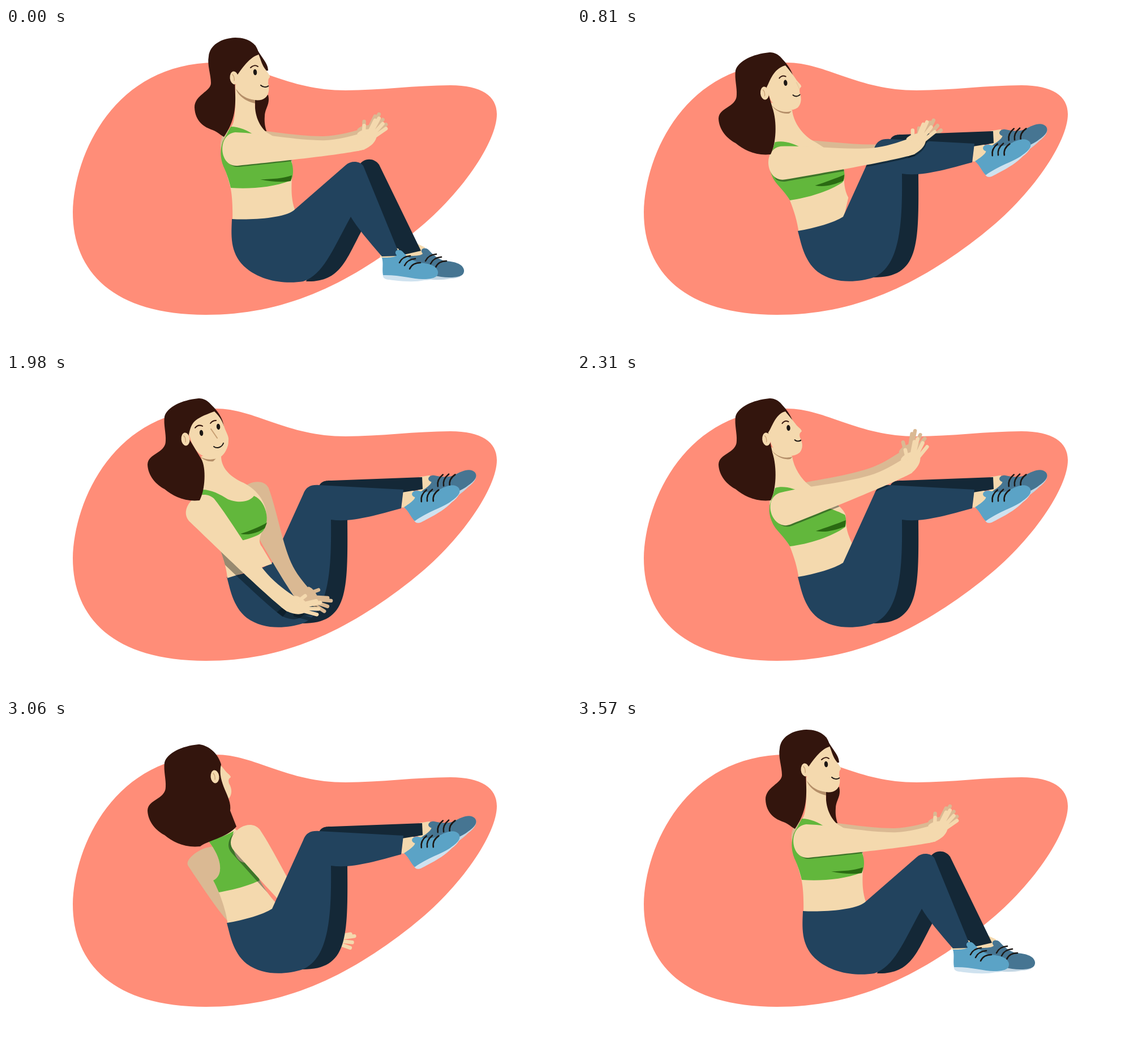
Recreate the animation shown at these times as an HTML page with a canvas. Size 998 px wide and 561 px high, loop 3600 ms.

```html
<!DOCTYPE html>
<html lang="en">
<head>
<meta charset="utf-8">
<title>Seated twist</title>
<style>
html, body { margin: 0; height: 100%; overflow: hidden; background: #fff; }
canvas { display: block; }
</style>
</head>
<body>
<canvas id="stage" width="998" height="561"></canvas>
<script>
const ctx = document.getElementById('stage').getContext('2d');
const LOOP = 3600;
const SKIN = '#f4d9ae', TAN = '#dab993', HAIR = '#33150d', INK = '#1c1714';
const PANTS = '#22435e', DARK = '#142837', GREEN = '#62b73c';

// Each part lists its sitting, leaning, turned-to-us and turned-away shapes.
const blob = 'M118,325 C120,222 192,62 370,61 C440,61 495,110 600,110 C660,110 725,101 785,101 C840,101 867,120 867,152 C867,200 805,295 715,365 C600,455 490,506 353,506 C190,506 118,430 118,325Z';

const torso = [
  'M405,100 L440,125 C438,150 445,170 460,184 C490,200 505,220 505,235 C507,265 500,290 510,320 L508,330 L400,345 C401,315 399,290 396,280 C390,255 380,235 381,212 C383,190 398,180 402,165 C406,150 405,120 405,100Z',
  'M342,128 L380,145 C383,165 395,185 412,198 C440,215 472,235 475,250 C474,270 480,285 486,298 L470,340 L392,362 C389,340 384,325 376,304 C365,285 345,265 341,240 C338,220 345,205 349,195 C351,180 343,150 342,128Z',
  'M345,145 L380,145 C380,165 395,180 415,190 C440,200 462,225 460,255 C458,275 440,290 452,305 L470,335 L391,360 C389,340 384,325 376,304 C365,285 345,265 341,240 C338,220 345,205 349,200 C348,180 346,165 345,145Z',
  'M342,128 L380,145 C385,165 395,185 408,195 C430,210 440,260 448,282 C455,295 465,310 476,322 L470,340 L392,362 C389,340 384,325 376,304 C372,295 369,288 366,283 C384,275 383,245 357,213 C352,190 343,150 342,128Z'];
const bra = [
  'M397,174 C412,174 428,181 438,189 L424,190 C440,205 480,220 502,232 C508,240 509,262 503,269 C470,282 430,284 397,282 C393,265 388,252 384,244 C378,228 378,215 383,200 L397,174Z',
  'M350,201 C365,196 385,202 399,210 L376,212 C380,225 440,230 474,249 C476,255 476,265 474,270 C450,287 410,300 376,304 C365,285 350,275 345,262 C338,245 340,240 340,232 L350,201Z',
  'M347,204 C362,204 378,212 392,221 L398,223 C415,228 430,225 438,215 C462,225 470,270 447,283 C430,292 400,298 376,304 C365,285 350,275 345,262 C338,245 340,240 345,225 L347,204Z',
  'M357,213 C372,210 390,203 402,196 L400,205 C400,235 408,252 425,252 C440,262 446,275 448,283 C430,292 400,300 376,304 C372,295 369,288 366,283 C384,275 383,245 357,213 L357,213Z'];
const braFold = [
  'M449,267 C470,267 490,265 505,260 L503,270 C490,272 470,272 449,267Z',
  'M422,277 C440,271 460,264 475,258 L474,269 C455,276 440,280 422,277Z',
  'M414,282 C430,277 448,270 461,262 L457,272 C445,280 430,285 414,282Z',
  'M447,282 C447,282 447,282 447,282 L447,282 C447,282 447,282 447,282Z'];

const strand = [
  'M440,30 C448,50 463,60 463,75 L455,76 L440,50Z',
  'M355,48 C368,58 380,75 383,90 L375,80 L355,60Z',
  'M355,48 C368,58 384,75 385,95 L375,80 L355,60Z'];
const lock = [
  'M440,122 L463,118 C467,135 458,140 457,155 C456,168 458,176 461,184 C450,180 440,160 440,150Z',
  'M360,140 L375,140 C375,150 372,160 372,165 C372,170 375,175 375,180 C365,175 360,160 360,150Z'];
const hair = [
  'M446,47 C446,30 430,17 405,17 C380,18 360,30 358,50 C355,65 362,82 362,97 C362,112 333,118 333,140 C334,165 350,175 365,180 C375,184 380,190 385,192 C400,170 406,150 405,118 L404,90 C412,78 428,52 446,47Z',
  'M368,66 C362,48 350,43 340,43 C310,46 285,58 280,75 C278,90 283,105 282,118 C282,140 250,140 250,160 C251,180 265,195 280,203 C295,215 315,226 342,223 C352,205 354,165 345,138 L338,103 C344,97 350,70 368,66Z',
  'M368,66 C362,48 350,43 340,43 C310,46 285,58 280,75 C278,90 283,105 282,118 C282,140 250,140 250,160 C251,180 265,195 280,203 C295,215 315,226 342,223 C352,205 354,165 345,150 L322,112 C327,85 330,80 368,66Z',
  'M380,78 C372,52 350,43 340,43 C310,46 285,58 280,75 C278,90 283,105 282,118 C282,140 250,140 250,160 C251,180 265,195 280,203 C295,215 315,226 343,223 C355,213 390,208 407,188 L396,160 C400,135 372,112 380,78Z'];
const face = [
  'M446,46 C450,55 452,66 459,74 C463,80 467,84 466,87 C462,90 464,94 463,97 C466,108 464,118 458,123 C450,130 435,128 425,122 C412,114 408,108 406,100 L402,80 L425,50Z',
  'M368,66 C375,75 380,80 386,88 C390,94 397,97 397,101 C392,104 393,108 394,112 C400,122 399,132 394,138 C385,146 370,146 362,142 C350,135 345,130 343,122 L335,95 L355,68Z',
  'M368,66 C378,75 383,85 386,95 C390,105 393,110 393,114 C393,118 393,122 392,126 C388,140 380,147 374,149 C360,152 345,145 338,137 C331,130 328,122 326,115 L320,98 L335,70Z'];
const chinShade = [
  'M406,107 C415,120 428,127 440,126 L440,133 C425,130 410,120 406,107Z',
  'M343,133 C352,145 365,150 381,146 L377,150 C365,152 350,145 343,133Z',
  'M343,146 C355,152 365,152 372,148 L366,154 C357,155 350,152 343,146Z'];
const ear = ['403 88', '335 115', '317 115', '369 100'];
const eyes = [['440 78', '374 95', '345 104', '402 92'], ['470 70', '396 85', '375 93', '410 85']];
const brows = [
  ['M432,70 C436,66 441,65 445,68', 'M363,87 C366,83 370,82 374,84', 'M334,95 C338,90 343,90 347,92', 'M393,87 C396,83 400,82 404,84'],
  ['M470,62 C474,60 478,60 480,62', 'M388,78 C391,74 395,73 398,74', 'M361,87 C364,83 368,82 371,82']];
const mouth = ['M450,101 C454,105 460,105 464,102', 'M385,116 C388,119 393,119 397,116', 'M367,128 C372,132 381,130 384,122', 'M405,116 C408,119 413,119 417,116'];
const nose = ['M466,80 L470,92', 'M394,96 L399,108', 'M362,97 L373,113'];

// Shoulder x, y, angle in degrees, length to the wrist.
const nearArm = ['407 214 -4 221', '368 238 -21 228', '346 241 46 228', '425 212 50 218'];
const farArm = ['404 207 -4 224', '368 230 -23 226', '437 214 63 194', '347 243 60 120'];
const armShape = new Path2D('M0,-30 C50,-25 110,-8 160,-5 C185,-4 205,-8 229,-13 L233,16 C200,22 90,26 0,29 C-34,30 -34,-29 0,-30Z');
const handShape = new Path2D('M-6,-13 C0,-20 20,-22 28,-14 C30,0 20,10 4,16 L-8,18Z');
const fingers = new Path2D('M5,-10 L7,-26 M14,-12 L27,-34 M17,-10 L34,-37 M18,-6 L40,-27 M18,-2 L45,-18');

const nearSit = 'M399,337 C430,339 490,336 508,322 L600,242 C610,233 625,235 631,243 L696,402 L664,403 C640,375 620,352 609,333 C575,395 560,435 525,447 C495,452 450,448 420,420 C395,395 398,365 399,337Z';
const nearLift = dx => `M390,358 C420,353 455,343 470,333 L525,212 C530,198 540,195 553,196 L${702 + dx},204 L${698 + dx},237 C650,250 610,262 574,257 C575,340 572,420 524,440 C495,449 455,452 425,430 C400,410 395,375 390,358Z`;
const farSit = 'M622,245 C630,228 650,228 659,241 L733,393 L694,402 L640,300 L628,358 C600,410 590,449 530,447 L560,380Z';
const farLift = dx => `M552,200 C556,188 565,188 575,188 L${735 + dx},182 L${736 + dx},203 L620,225 L603,258 C604,385 604,440 524,440 L560,380Z`;
const shoe = new Path2D('M0,0 C10,0 24,0 26,-4 C20,-11 28,-17 36,-11 C44,-2 55,7 66,9 C80,10 97,13 99,25 C100,36 88,38 72,38 C55,38 30,30 2,31 C0,20 3,10 0,0Z');
const sole = new Path2D('M2,28 C0,38 8,39 20,40 C45,43 60,43 75,40 C90,40 97,34 98,30 C80,40 40,26 2,28Z');
const ankle = new Path2D('M-4,-2 L13,-23 L30,-15 L26,0 L2,2Z');
const laces = new Path2D('M31,9 Q36,-2 50,-3 M40,14 Q45,3 59,2 M49,20 Q54,9 68,9');

let weights;

const ease = (t, from, to) => {
  const u = Math.min(1, Math.max(0, (t - from) / (to - from)));
  return u * u * (3 - 2 * u);
};

// Blends the numbers of a part's shapes by the current weights.
function pose([sit, lean, turn = lean, away = lean], [l, p, q] = weights) {
  const number = /-?[\d.]+/g;
  const [b, c, d] = [lean, turn, away].map(s => s.match(number).map(Number));
  let i = 0;
  return sit.replace(number, a => {
    const value = +a + (b[i] - a) * l + (c[i] - b[i]) * p + (d[i] - b[i]) * q;
    i++;
    return value.toFixed(2);
  });
}
const shape = (part, w) => new Path2D(pose(part, w));
const values = (part, w) => pose(part, w).split(' ').map(Number);

function fill(color, path) {
  ctx.fillStyle = color;
  ctx.fill(path);
}
function stroke(color, width, path) {
  ctx.strokeStyle = color;
  ctx.lineWidth = width;
  ctx.stroke(path);
}
function oval(color, [x, y], rx, ry) {
  const path = new Path2D();
  path.ellipse(x, y, rx, ry, -0.1, 0, 7);
  fill(color, path);
}

function drawArm(part, color, dx = 0, dy = 0) {
  const [x, y, angle, length] = values(part);
  ctx.save();
  ctx.translate(x + dx, y + dy);
  ctx.rotate(angle * Math.PI / 180);
  ctx.save();
  ctx.scale(length / 228, 1);
  fill(color, armShape);
  ctx.restore();
  ctx.translate(length, 0);
  fill(color, handShape);
  stroke(color, 6.5, fingers);
  ctx.restore();
}

function drawNearArm(body) {
  const [, p, q] = weights;
  ctx.save();
  ctx.clip(body);
  drawArm(nearArm, 'rgba(0,8,12,.38)', 3 - 11 * p - 7 * q, 2 + 7 * p + 2 * q);
  ctx.restore();
  drawArm(nearArm, SKIN);
}

function onFoot(keys, legs, draw) {
  const [x, y] = values(keys, legs);
  ctx.save();
  ctx.translate(x, y);
  ctx.rotate(-34 * legs[0] * Math.PI / 180);
  draw();
  ctx.restore();
}
function drawLeg(leg, pantsColor, foot, legs, shoeColor, soleColor) {
  onFoot(foot, legs, () => fill(SKIN, ankle));
  fill(pantsColor, leg);
  onFoot(foot, legs, () => {
    fill(soleColor, sole);
    fill(shoeColor, shoe);
    stroke(INK, 2.6, laces);
  });
}

function drawHead() {
  const outline = shape(face);
  fill('#b58f69', shape(chinShade));
  fill(SKIN, outline);
  ctx.save();
  ctx.clip(outline);
  eyes.forEach(eye => oval(INK, values(eye), 3.2, 5.2));
  brows.forEach(brow => stroke(HAIR, 2, shape(brow)));
  stroke(INK, 2, shape(mouth));
  ctx.globalAlpha = weights[1];
  stroke('#c89f73', 2, shape(nose));
  ctx.restore();
  fill(HAIR, shape(hair));
  const [x, y] = values(ear);
  oval(SKIN, [x, y], 7.5, 11.5);
  stroke('#c89f73', 1.2, new Path2D(`M${x - 3},${y - 6} q4,4 3,11`));
}

function draw(t) {
  const lean = ease(t, 100, 540) - ease(t, 3250, 3565);
  const turn = ease(t, 360, 1950) - ease(t, 1970, 2340);
  const away = ease(t, 2400, 2950) - ease(t, 3070, 3400);
  const lift = ease(t, 530, 780) - ease(t, 3250, 3570);
  weights = [lean, turn, away];
  const legs = [lift, 4 * lift * (1 - lift), 0];

  ctx.fillStyle = '#fff';
  ctx.fillRect(0, 0, 998, 561);
  fill('#ff8d78', new Path2D(blob));

  const trunk = shape(torso);
  const nearLeg = shape([nearSit, nearLift(0), nearLift(17)], legs);
  const farLeg = shape([farSit, farLift(0), farLift(17)], legs);
  const body = new Path2D(trunk);
  body.addPath(nearLeg);
  const drawLegs = () => {
    drawLeg(farLeg, DARK, ['710 402', '732 208', '749 208'], legs, '#467592', '#c3d6e3');
    drawLeg(nearLeg, PANTS, ['664 405', '703 235', '720 235'], legs, '#5ba3c6', '#cfe2ef');
  };
  const drawChest = () => {
    fill(GREEN, shape(bra));
    fill('#2a6a12', shape(braFold));
    drawNearArm(body);
  };
  const armsOverLegs = turn > 0.4, armsBehindLegs = away > 0.4;

  fill(HAIR, shape(strand));
  fill(HAIR, shape(lock));
  if (armsOverLegs) drawLegs();
  drawArm(farArm, TAN);
  fill(SKIN, trunk);
  if (armsBehindLegs) drawChest();
  if (!armsOverLegs) drawLegs();
  if (!armsBehindLegs) drawChest();
  drawHead();
}

function frame(now) {
  draw(now % LOOP);
  requestAnimationFrame(frame);
}
ctx.lineCap = ctx.lineJoin = 'round';
requestAnimationFrame(frame);
</script>
</body>
</html>
```
